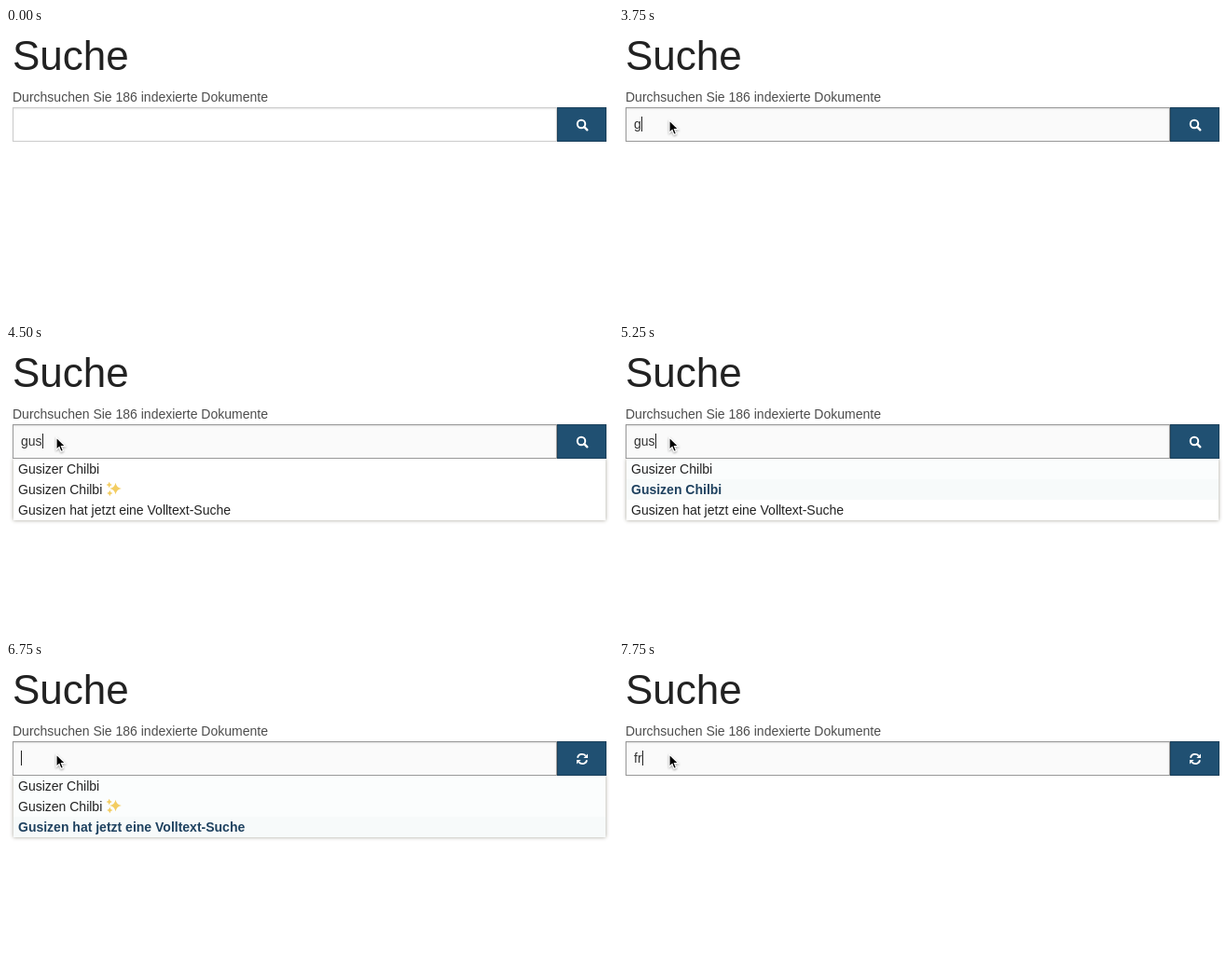
An HTML page for the animation above (8 s loop, 651x310 px).

```html
<!DOCTYPE html>
<html lang="de">
<head>
<meta charset="utf-8">
<title>Suche</title>
<style>
  html, body { margin: 0; width: 100%; height: 100%; overflow: hidden; background: #fff; }
  body { position: relative; font: 14px/14px "Liberation Sans", Arial, sans-serif; color: #222; }
  body * { box-sizing: border-box; }
  h1, label, .field, .button, .results, .typed, .caret, .pointer { position: absolute; margin: 0; white-space: pre; }
  h1 { left: 7px; top: 8px; font: 400 44px/44px "Liberation Sans", Arial, sans-serif; }
  label { left: 7px; top: 67px; color: #4d4d4d; }
  .field { left: 7px; top: 85px; width: 584px; height: 37px; background: #fff;
    border: 1px solid #ccc; box-shadow: inset 0 1px 2px rgba(0, 0, 0, .1); }
  .field.focus { background: #fafafa; border-color: #999; }
  .typed { left: 16px; top: 96px; color: #333; }
  .caret { top: 95px; width: 1px; height: 16px; background: #222; }
  .button { left: 591px; top: 85px; width: 53px; height: 37px; background: #205072; border: 1px solid #1a405b; }
  .button svg { position: absolute; left: 19px; top: 11px; }
  .results { left: 8px; top: 122px; width: 635px; background: #fff; box-shadow: 0 0 4px rgba(50, 45, 20, .45); }
  .row { height: 22px; padding-left: 5px; line-height: 22px; }
  .row.seen { background: #fbfdfd; }
  .row.active { color: #1f4260; font-weight: 700; }
  .row.active:not(:first-child) { background: #f7fafa; }
  .row svg { vertical-align: top; margin: 2px 0 0 4px; }
  .row.active svg { display: none; }
  .pointer { left: 0; top: 0; filter: drop-shadow(0 1px 1px rgba(0, 0, 0, .35)); }
</style>
</head>
<body>
<h1>Suche</h1>
<label>Durchsuchen Sie 186 indexierte Dokumente</label>
<div class="results"></div>
<div class="field"></div>
<div class="typed"></div>
<div class="caret"></div>
<div class="button">
  <svg width="14" height="14" viewBox="-7 -7 14 14" fill="none" stroke="#fff">
    <g class="search" stroke-width="2">
      <circle cx="-1" cy="-1" r="4.2"/>
      <path d="M2.2 2.2L5.3 5.3" stroke-width="2.4" stroke-linecap="round"/>
    </g>
    <g class="busy" stroke-width="1.8">
      <g id="half"><path d="M-5-1.2A5 5 0 0 1 3.7-3.4"/><path d="M6-5.6V-1H1.4z" fill="#fff" stroke="none"/></g>
      <use href="#half" transform="rotate(180)"/>
    </g>
  </svg>
</div>
<svg class="pointer" width="13" height="19" viewBox="0 0 13 19">
  <path d="M1 1V14.4L4 11.6L6 16.4L8.5 15.4L6.5 10.7H10.7Z" stroke="#fff" stroke-width="1.2"/>
</svg>
<script>
const LOOP = 8000;
const $ = q => document.querySelector(q);
const field = $('.field'), typed = $('.typed'), caret = $('.caret'), results = $('.results'),
      search = $('.search'), busy = $('.busy'), pointer = $('.pointer');

const star = (x, y, r) =>
  `<path transform="translate(${x} ${y}) scale(${r})" d="M0-1Q.16-.16 1 0Q.16.16 0 1Q-.16.16-1 0Q-.16-.16 0-1"/>`;
const sparkles = '<svg width="17" height="17" fill="#f3cd62">' +
  star(10.5, 8, 6.3) + star(3.7, 4, 3.2) + star(4.3, 13, 3.2) + '</svg>';

const lists = {
  none: [],
  broad: ['Gemeinderat', 'Gewerbeverzeichnis', 'Gusizer Chilbi', 'Gusizen Chilbi' + sparkles, 'Grundbuchamt'],
  exact: ['Gusizer Chilbi', 'Gusizen Chilbi' + sparkles, 'Gusizen hat jetzt eine Volltext-Suche']
};

// Each step lists only what differs from the one before.
const start = { at: null, focus: false, caret: false, text: '', list: 'none', sel: -1, busy: false };
const steps = [
  [0, {}],
  [750, { at: [548, 4] }],
  [1000, { at: [129, 162] }],
  [1250, { at: [55, 94] }],
  [1500, { at: [54, 96], focus: true, caret: true }],
  [1750, { at: [53, 98], caret: false }],
  [2250, { caret: true }],
  [2750, { caret: false }],
  [3250, { caret: true }],
  [3750, { text: 'g' }],
  [4000, { list: 'broad' }],
  [4250, { text: 'gus' }],
  [4500, { list: 'exact' }],
  [5000, { sel: 0 }],
  [5250, { sel: 1 }],
  [5750, { sel: 2 }],
  [6250, { caret: false }],
  [6500, { text: 'gu', caret: true }],
  [6750, { text: '', busy: true }],
  [7000, { list: 'none', sel: -1, busy: false }],
  [7500, { caret: false }],
  [7750, { text: 'fr', caret: true, busy: true }]
];
let last = start;
const states = steps.map(([time, change]) => ({ time, state: last = { ...last, ...change } }));

const show = (el, on) => { el.style.display = on ? '' : 'none'; };

function render(s) {
  field.classList.toggle('focus', s.focus);
  typed.textContent = s.text;
  caret.style.left = Math.round(16 + typed.getBoundingClientRect().width) + 'px';
  show(caret, s.caret);
  show(search, !s.busy);
  show(busy, s.busy);
  show(pointer, s.at);
  if (s.at) pointer.style.transform = `translate(${s.at[0]}px, ${s.at[1]}px)`;
  const rows = lists[s.list];
  show(results, rows.length);
  results.innerHTML = rows.map((row, i) => {
    const look = i === s.sel ? 'active' : i < s.sel ? 'seen' : '';
    return `<div class="row ${look}">${row}</div>`;
  }).join('');
}

let shown;
const begin = performance.now();
function tick() {
  const t = (performance.now() - begin) % LOOP;
  const now = states.findLast(s => s.time <= t).state;
  if (now !== shown) render(shown = now);
  requestAnimationFrame(tick);
}
tick();
</script>
</body>
</html>
```
